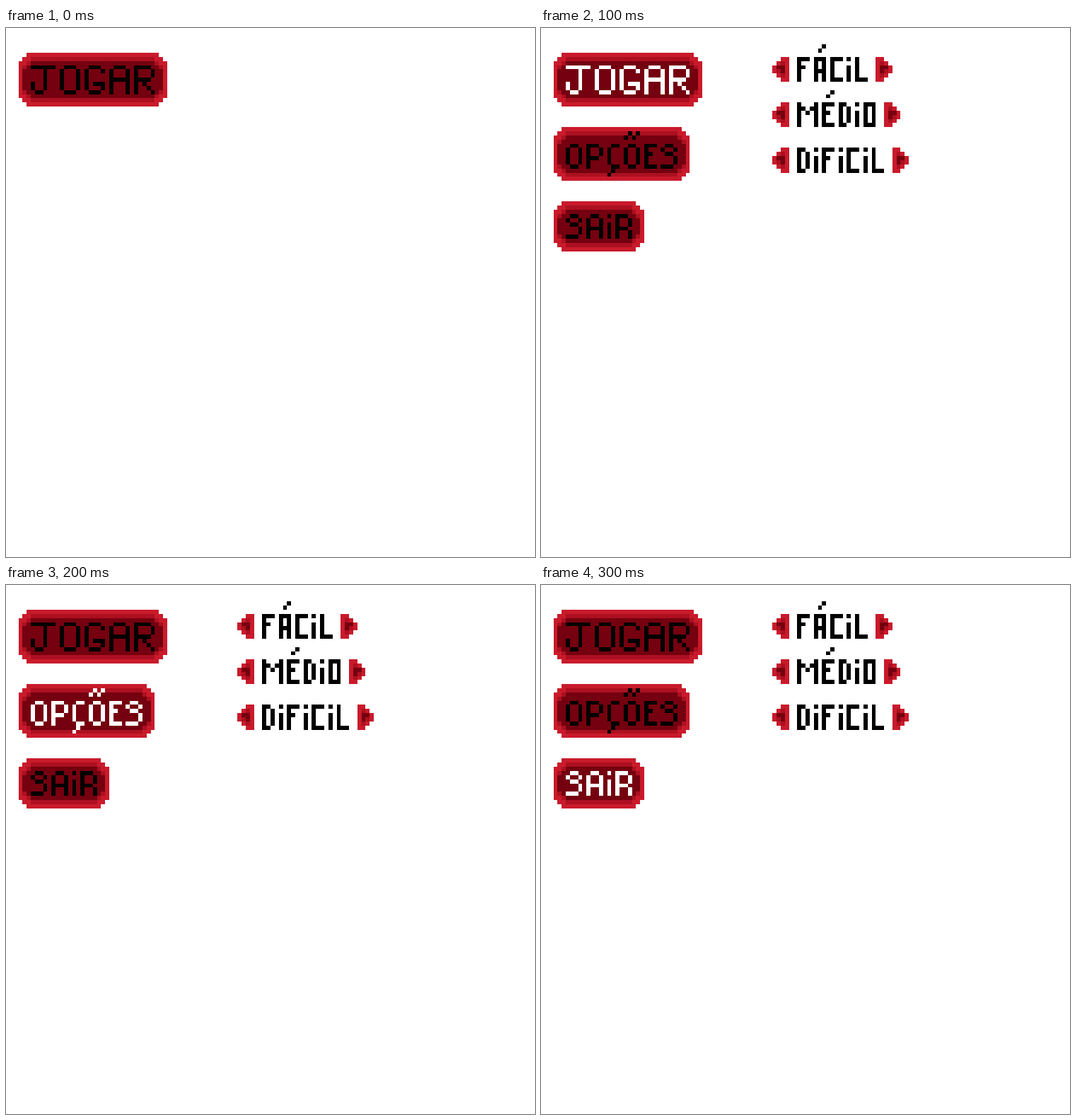
These frames come from a looping animation (748x748 px, 400 ms). An HTML page with a canvas:

```html
<!DOCTYPE html>
<html lang="pt">
<head>
<meta charset="utf-8">
<title>Menu</title>
<style>
html, body { margin: 0; width: 100%; height: 100%; overflow: hidden; background: #fff; }
canvas { display: block; }
</style>
</head>
<body>
<canvas id="stage" width="748" height="748" role="img" aria-label="Jogar, Opções, Sair; Fácil, Médio, Dificil"></canvas>
<script>
const ctx = document.getElementById('stage').getContext('2d');
const CELL = 748 / 128;
const BRIGHT = '#c91a2b', MEDIUM = '#ac1020', DARK = '#75000f';

// Letters are pen strokes: each pair of digits is a point x, y on the grid.
const BIG = {
  J: '0050 303526160504',
  O: '103041453616050110',
  G: '41301001051636454424',
  A: '060110304146 0343',
  R: '06003041423303 2446'
};
const MID = {
  O: '102031342515040110',
  P: '05002031322303',
  C: '201001041525',
  E: '20000525 0212',
  S: '31201001122233342505',
  A: '050110203135 0333',
  i: '00 0205',
  R: '05002031322303 3435'
};
const SLIM = {
  F: '200005 0212',
  A: '05002025 0323',
  C: '20000525',
  i: '00 0205',
  L: '000525',
  M: '0500224045',
  E: '20000525 0212',
  D: '00102124150500',
  O: '0020250500'
};
// Combining acute, tilde and cedilla: row offset and strokes.
const MARKS = {
  '\u0301': [-3, '1120'],
  '\u0303': [-3, '01102130'],
  '\u0327': [6, '1001']
};

const buttons = [
  { text: 'JOGAR', font: BIG, y: 6, h: 13, textY: 9 },
  { text: 'OPÇÕES', font: MID, y: 24, h: 13, textY: 28 },
  { text: 'SAiR', font: MID, y: 42, h: 12, textY: 45 }
];
const levels = [['FÁCiL', 7], ['MÉDiO', 18], ['DiFiCiL', 29]];

function block(x, y, w, h, color) {
  const left = Math.round(x * CELL), top = Math.round(y * CELL);
  ctx.fillStyle = color;
  ctx.fillRect(left, top, Math.round((x + w) * CELL) - left, Math.round((y + h) * CELL) - top);
}

function strokes(data, x, y, color) {
  for (const line of data.split(' ')) {
    const points = line.match(/../g).map(p => [+p[0], +p[1]]);
    let [px, py] = points[0];
    block(x + px, y + py, 1, 1, color);
    for (const [qx, qy] of points) {
      while (px !== qx || py !== qy) {
        px += Math.sign(qx - px);
        py += Math.sign(qy - py);
        block(x + px, y + py, 1, 1, color);
      }
    }
  }
}

function glyphWidth(data) {
  return 1 + Math.max(...data.replace(/ /g, '').match(/../g).map(p => +p[0]));
}

// Returns the column just after the last letter.
function write(text, font, x, y, color) {
  let start = x, next = x;
  for (const ch of text.normalize('NFD')) {
    if (MARKS[ch]) {
      const [dy, data] = MARKS[ch];
      strokes(data, start, y + dy, color);
    } else {
      start = next;
      strokes(font[ch], start, y, color);
      next = start + glyphWidth(font[ch]) + 1;
    }
  }
  return next - 1;
}

function textWidth(text, font) {
  const letters = [...text.normalize('NFD')].filter(ch => font[ch]);
  return letters.reduce((sum, ch) => sum + glyphWidth(font[ch]) + 1, -1);
}

function plate(x, y, w, h, color) {
  for (const cut of [0, 1, 2]) block(x + cut, y + 2 - cut, w - 2 * cut, h - 4 + 2 * cut, color);
}

function drawButton({ text, font, y, h, textY }, active) {
  const w = textWidth(text, font) + 6;
  plate(3, y, w, h, BRIGHT);
  plate(4, y + 1, w - 2, h - 2, MEDIUM);
  plate(4, y + 2, w - 2, h - 4, DARK);
  write(text, font, 6, textY, active ? '#fff' : '#000');
}

// dir is 1 for an arrow pointing right, -1 for left; x is its base column.
function arrow(x, y, dir) {
  const put = (dx, dy, w, h, color) => block(dir > 0 ? x + dx : x - dx - w + 1, y + dy, w, h, color);
  put(0, 0, 2, 6, BRIGHT);
  put(2, 1, 1, 4, BRIGHT);
  put(3, 2, 1, 2, BRIGHT);
  put(1, 1, 1, 4, MEDIUM);
  put(2, 3, 1, 1, MEDIUM);
  put(1, 2, 2, 1, DARK);
  put(1, 3, 1, 1, DARK);
}

function drawLevel([text, y]) {
  arrow(59, y, -1);
  const end = write(text, SLIM, 62, y, '#000');
  arrow(end + 2, y, 1);
}

function draw(step) {
  ctx.fillStyle = '#fff';
  ctx.fillRect(0, 0, 748, 748);
  const visible = step ? buttons : buttons.slice(0, 1);
  visible.forEach((button, i) => drawButton(button, i === step - 1));
  if (step) levels.forEach(drawLevel);
}

const start = performance.now();
let shown = 0;
function tick(now) {
  const step = Math.floor(Math.max(0, now - start) / 100) % 4;
  if (step !== shown) draw(shown = step);
  requestAnimationFrame(tick);
}
draw(0);
requestAnimationFrame(tick);
</script>
</body>
</html>
```
